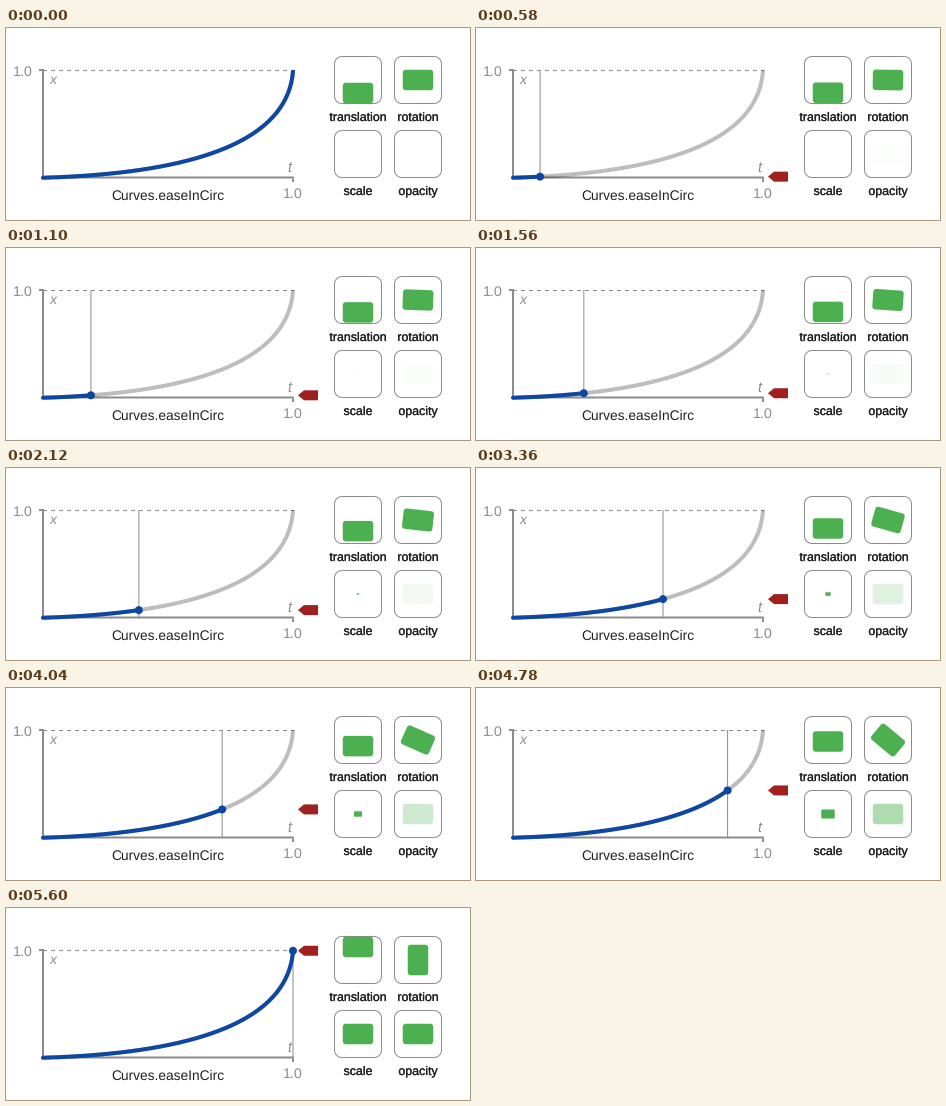
Recreate the animation shown at these times as a matplotlib script. Size 464 by 192 pixels, loop 5620 ms.

```python
import numpy as np
import matplotlib.pyplot as plt
from matplotlib import patheffects
from matplotlib.animation import FuncAnimation
from matplotlib.patches import Circle, Polygon, Rectangle
from matplotlib.transforms import Affine2D

W, H, DPI = 464, 192, 64
PX = 72 / DPI  # points per pixel
LOOP, TICK = 5620, 20
STEPS = 120

LEFT, RIGHT, TOP, BASE = 37, 287, 42.75, 149.75
GRAY, BLUE, GREEN, RED = "#8c8c8c", "#0d47a1", "#4caf50", "#a02020"

plt.rcParams["font.family"] = "Liberation Sans"
plt.rcParams["text.hinting"] = "none"

fig = plt.figure(figsize=(W / DPI, H / DPI), dpi=DPI, facecolor="white")
ax = fig.add_axes([0, 0, 1, 1])
ax.set_xlim(0, W)
ax.set_ylim(H, 0)
ax.axis("off")


def bezier(s, a, b):
    return 3 * a * s * (1 - s) ** 2 + 3 * b * s**2 * (1 - s) + s**3


S = np.linspace(0, 1, 1001)
CURVE_T = bezier(S, 0.6, 0.98)
CURVE_V = bezier(S, 0.04, 0.335)


def to_x(t):
    return LEFT + (RIGHT - LEFT) * t


def to_y(v):
    return BASE + (TOP - BASE) * v


def line(xs, ys, color, width, **kw):
    kw.setdefault("solid_capstyle", "butt")
    return ax.plot(xs, ys, color=color, lw=width * PX, snap=False, **kw)[0]


def text(x, y, s, size, color, **kw):
    kw.setdefault("ha", "center")
    return ax.text(x, y, s, fontsize=size * PX, color=color, va="baseline", **kw)


def rounded(cx, cy, w, h, r, **kw):
    """Rectangle around (cx, cy) with circular corners."""
    arcs = []
    for q in range(4):
        a = np.linspace(0, np.pi / 2, 9) + q * np.pi / 2
        sx, sy = np.sign(np.cos(a.mean())), np.sign(np.sin(a.mean()))
        arcs.append(np.column_stack([cx + sx * (w / 2 - r) + r * np.cos(a),
                                     cy + sy * (h / 2 - r) + r * np.sin(a)]))
    return ax.add_patch(Polygon(np.vstack(arcs), closed=True, **kw))


def block():
    return rounded(0, 0, 30.5, 20.5, 3, fc=GREEN, ec="none", zorder=5)


# Graph axes
line([LEFT, RIGHT + 1], [42.5, 42.5], GRAY, 1, dashes=(4, 4),
     dash_capstyle="butt", zorder=1)
line([LEFT, LEFT], [41, 150.5], GRAY, 2, zorder=1)
line([LEFT + 1, RIGHT + 1], [149.5, 149.5], GRAY, 2, zorder=1)
line([33, LEFT - 1], [42, 42], GRAY, 2, zorder=1)
line([RIGHT, RIGHT], [150.5, 154], GRAY, 2, zorder=1)

text(17, 48, "1.0", 14.2, GRAY)
text(287, 170, "1.0", 14.2, GRAY)
text(47, 56, "x", 14, GRAY, style="italic")
text(283.5, 144, "t", 14.5, GRAY, style="italic")
text(161.7, 172, "Curves.easeInCirc", 13.7, "#212121")

# Graph curve and markers
full = line(to_x(CURVE_T), to_y(CURVE_V), "black", 4, alpha=0.26,
            solid_capstyle="round", zorder=2)
marker = line([], [], GRAY, 1, zorder=3)
progress = line([], [], BLUE, 4, solid_capstyle="round", zorder=4)
for curve in (full, progress):
    curve.set_clip_path(Rectangle((0, 42), W, H - 42, transform=ax.transData))
dot = ax.add_patch(Circle((0, 0), 4, fc=BLUE, ec="none", zorder=5))
arrow = ax.add_patch(Polygon([[0, 0]], closed=True, fc=RED, ec="none", zorder=5))
ARROW = np.array([[292, 0], [298, -5], [312, -5], [312, 5], [298, 5]])

# Sample tiles
TILES = {
    "translation": (352, 52),
    "rotation": (412, 52),
    "scale": (352, 126),
    "opacity": (412, 126),
}
medium = [patheffects.withStroke(linewidth=0.25 * PX, foreground="#212121")]
for name, (cx, cy) in TILES.items():
    rounded(cx, cy, 47, 47, 7.5, fc="none", ec=GRAY, lw=PX, zorder=3)
    text(cx, cy + 41, name, 12.4, "#212121", path_effects=medium)
blocks = {name: block() for name in TILES}


def place(name, dy=0, angle=0, scale=1):
    cx, cy = TILES[name]
    move = Affine2D().scale(scale).rotate_deg(angle).translate(cx, cy + dy)
    blocks[name].set_transform(move + ax.transData)


def step_at(k):
    """Each 140 ms holds three steps lasting 20, 100 and 20 ms."""
    cycle, part = divmod(k, 7)
    return 3 * cycle + (0 if part == 0 else 1 if part < 6 else 2)


def draw(k):
    step = step_at(k)
    t = step / STEPS
    s = np.interp(t, CURVE_T, S)
    v = bezier(s, 0.04, 0.335)
    x, y = to_x(t), to_y(v)
    running = step > 0

    done = S <= s if running else S <= 1
    xs, ys = to_x(CURVE_T[done]), to_y(CURVE_V[done])
    if running:
        xs, ys = np.append(xs, x), np.append(ys, y)
    progress.set_data(xs, ys)
    marker.set_data([x, x], [42, 150])
    dot.center = x, y
    arrow.set_xy(ARROW + [0, y])
    for part in (marker, dot, arrow):
        part.set_visible(running)

    place("translation", dy=13 - 26 * v)
    place("rotation", angle=90 * v)
    place("scale", scale=max(v, 1e-3))
    place("opacity")
    blocks["scale"].set_visible(running)
    blocks["opacity"].set_alpha(min(max(v, 0), 1))
    return ()


anim = FuncAnimation(fig, draw, frames=LOOP // TICK, interval=TICK,
                     repeat=True, repeat_delay=0, blit=False)
plt.show()
```
